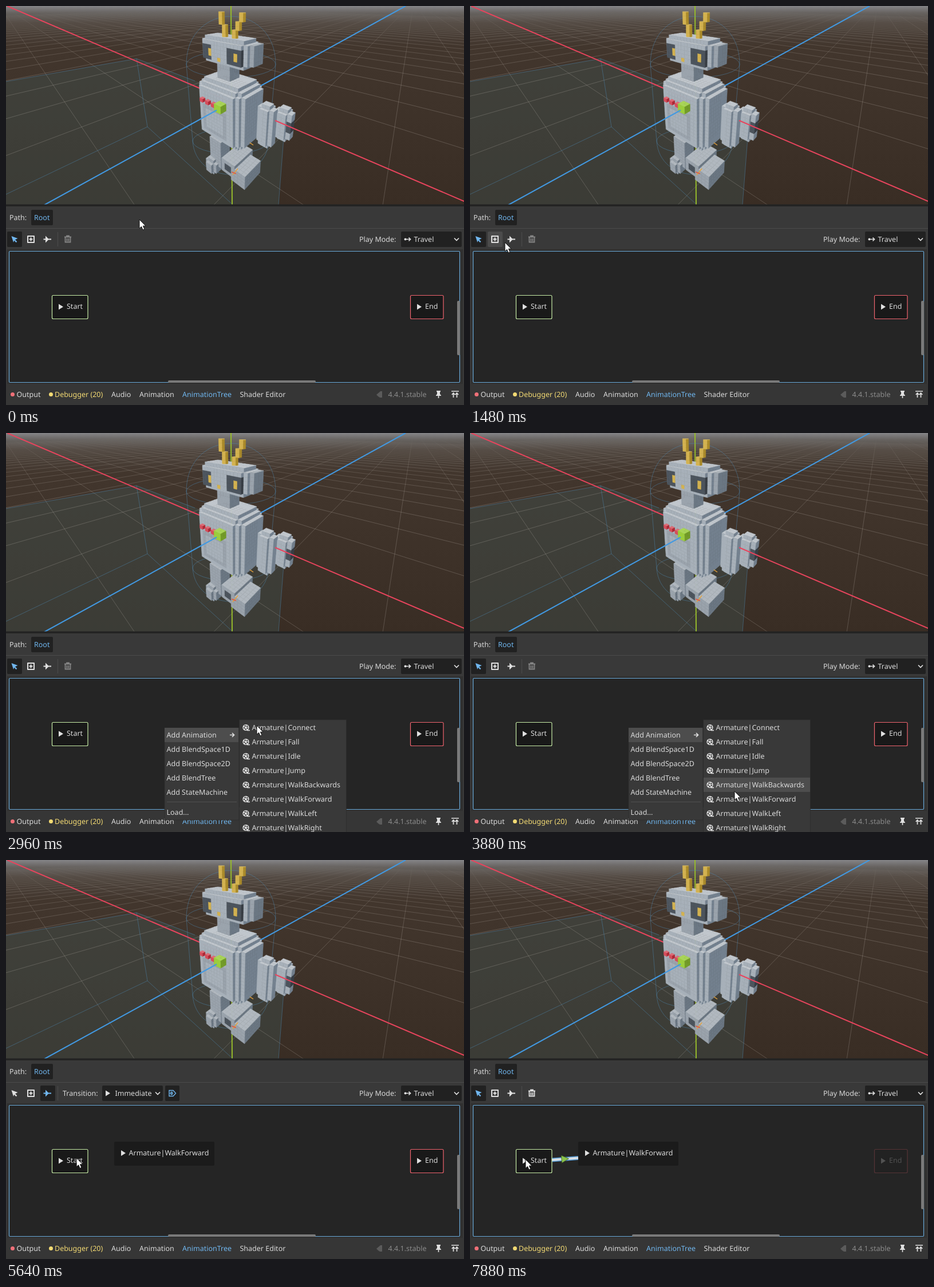
An HTML page that plays this animation: 800x697 px, repeating every 8 s.

```html
<!DOCTYPE html>
<html lang="en">
<head>
<meta charset="utf-8">
<title>State machine editor</title>
<style>
html, body { margin: 0; width: 100%; height: 100%; overflow: hidden; background: #393939; }
svg { display: block; width: 100vw; height: 100vh; }
text { font: 12.5px "Noto Sans", "Open Sans", sans-serif; fill: #dadada; text-rendering: geometricPrecision; white-space: pre; }
.blue { fill: #70b6ee; }
.yellow { fill: #f3da73; }
.dim { fill: #8b8b8b; }
.well { fill: #212121; }
.wire { fill: none; stroke: #4f8db8; stroke-opacity: .45; }
.ico { fill: none; stroke: #e0e0e0; stroke-width: 1.7; }
.solid { fill: #e0e0e0; }
.thumb { fill: #7a7a7a; }
.node { fill: #191919; stroke-width: 1.2; }
</style>
</head>
<body>
<svg viewBox="0 0 800 697">
  <defs>
    <linearGradient id="ground" x2="0" y2="1">
      <stop offset="0" stop-color="#858588"/><stop offset=".035" stop-color="#66625f"/>
      <stop offset=".085" stop-color="#504740"/><stop offset=".2" stop-color="#42362d"/>
      <stop offset="1" stop-color="#392d24"/>
    </linearGradient>
    <linearGradient id="fade" gradientUnits="userSpaceOnUse" x1="0" y1="8" x2="0" y2="130">
      <stop offset="0" stop-color="#d8d0c8" stop-opacity="0"/>
      <stop offset=".35" stop-color="#d8d0c8" stop-opacity=".15"/>
      <stop offset="1" stop-color="#d8d0c8" stop-opacity=".22"/>
    </linearGradient>
    <clipPath id="view"><path d="M0 0H800V347H0Z"/></clipPath>
    <path id="play" d="M0-5 8 0 0 5Z"/>
    <path id="chevron" d="M-4-2 0 2 4-2" class="ico"/>
    <g id="reel">
      <circle r="5.6" fill="#e0e0e0"/><path d="M2 5H7" stroke="#e0e0e0" stroke-width="1.6"/>
      <circle r="3" fill="none" stroke="#383838" stroke-width="2.4" stroke-dasharray="2.2 1.57"/>
    </g>
  </defs>

  <g clip-path="url(#view)">
    <path fill="url(#ground)" d="M0 0H800V347H0Z"/>
    <path fill="#3e4e4c" fill-opacity=".45" d="M0 132 228 92 488 190 476 347H0Z"/>
    <path id="grid" fill="none" stroke="url(#fade)"/>
    <path class="wire" d="M0 132 228 92 247 211 0 329M247 211 396 347M228 92 330 131M487 205 476 347"/>
    <g fill="none" stroke-width="2">
      <path stroke="#e8445d" d="M2 0 394 167.500"/>
      <path stroke="#4299e1" d="M394 167.500 698 0"/>
      <path stroke="#95b92c" d="M393 0 395 347"/>
    </g>
    <path class="wire" d="M315 102C315-10 471-10 471 102L459 235C455 314 330 314 326 235Z"/>
    <ellipse class="wire" cx="393" cy="102" rx="78" ry="23"/>
    <ellipse class="wire" cx="392" cy="236" rx="66" ry="22"/>
    <g id="robot" stroke-width=".5" stroke-linejoin="round"></g>
    <g fill="none" stroke-width="2">
      <path stroke="#4299e1" d="M67 347.500 368 182"/>
      <path stroke="#e8445d" d="M470 200 800 341"/>
      <path stroke="#e6a23c" stroke-width="1.500" d="M396 295 405 284M426 239 432 243"/>
      <path stroke="#e2583f" stroke-width="1.500" d="M394 290 402 293"/>
    </g>
  </g>

  <path fill="#393939" d="M0 347H800V697H0Z"/>
  <path fill="#232323" d="M0 346.500H800V350H0Z"/>
  <text x="6" y="373.500">Path:</text>
  <rect class="well" x="44" y="356" width="38" height="27" rx="2"/>
  <text x="49" y="373.500" class="blue">Root</text>
  <path stroke="#4b4b4b" d="M0 388.500H800M90.500 395V420"/>

  <rect id="selectBg" x="2" y="394" width="26" height="27" rx="2"/>
  <rect id="addBg" x="31" y="394" width="26" height="27" rx="2"/>
  <rect id="connectBg" x="60" y="394" width="26" height="27" rx="2"/>
  <path id="selectIcon" d="M9.500 402 20.500 406 16 408.200 19.300 411.600 17.700 413.200 14.300 409.800 13 413Z"/>
  <path class="ico" d="M38 402H49V413H38ZM43.500 404.500V410.500M40.500 407.500H46.500" stroke-linejoin="round" style="stroke-width:2"/>
  <path id="connectIcon" d="M65.500 406.500H69V401.500L74 406.500H79V408.500H74L69 413.500V408.500H65.500Z"/>
  <path id="trash" fill="none" stroke="#e0e0e0" stroke-width="1.800" d="M102 403.500H114M106 403V401.500H110V403M103.500 404V412.500H112.500V404M106.500 406V411M109.500 406V411"/>
  <g id="transitionBar">
    <text x="99" y="411.500">Transition:</text>
    <rect class="well" x="168" y="394" width="106" height="27" rx="2"/>
    <use href="#play" x="174" y="407.500" class="solid"/>
    <text x="190.500" y="411.500">Immediate</text>
    <use href="#chevron" x="265" y="407.500"/>
    <rect class="well" x="278" y="394" width="25" height="27" rx="2"/>
    <path d="M285 402.500H292L296.500 407.500 292 412.500H285ZM286 407.500H292M287.500 405.500H291M287.500 409.500H291" fill="none" stroke="#70b6ee" stroke-width="1.400"/>
  </g>
  <text x="617" y="411.500">Play Mode:</text>
  <rect class="well" x="690" y="394" width="106" height="27" rx="2"/>
  <path class="ico" d="M697 407.500H706M703.500 404.500 706.500 407.500 703.500 410.500"/><circle class="solid" cx="697.500" cy="407.500" r="2"/>
  <text x="712.500" y="411.500">Travel</text>
  <use href="#chevron" x="787" y="407.500"/>

  <rect x="2" y="425" width="796" height="235" fill="#303030"/>
  <rect x="5.500" y="428.500" width="787" height="229" rx="1.500" fill="#252525" stroke="#69a9d8" stroke-width="1.200"/>
  <rect class="thumb" x="788" y="515" width="5" height="95" rx="2"/>
  <rect class="thumb" x="283" y="654" width="258" height="4" rx="2"/>
  <path fill="#363636" d="M0 660H800V697H0Z"/>

  <g id="link">
    <path id="linkEdge" stroke="#5499d2" stroke-width="7"/>
    <path id="linkCore" stroke="#d9e0e6" stroke-width="4"/>
    <path id="linkArrow" d="M-6-6.500 6.500 0-6 6.500Z" fill="#8bc34a" stroke="#3d5a28" stroke-width=".8"/>
  </g>
  <rect class="node" x="80.500" y="505.500" width="62.500" height="41" rx="2" stroke="#c6eca6"/>
  <use href="#play" x="92" y="525.500" class="solid"/><text x="106" y="529">Start</text>
  <g id="end">
    <rect class="node" x="706.500" y="505.500" width="57.500" height="41" rx="2" stroke="#f0646f"/>
    <use href="#play" x="718" y="525.500" class="solid"/><text x="732" y="529">End</text>
  </g>
  <g id="walk">
    <rect x="189" y="492" width="175" height="42" rx="2" fill="#1b1b1b"/>
    <use href="#play" x="201" y="512" class="solid"/><text x="214.500" y="516">Armature|WalkForward</text>
  </g>

  <circle cx="11.500" cy="678.500" r="3.500" fill="#ef7078"/><text x="18.500" y="682.500">Output</text>
  <circle cx="78.500" cy="678.500" r="3.500" fill="#f3da73"/><text x="85" y="682.500" class="yellow">Debugger (20)</text>
  <text x="184" y="682.500">Audio</text>
  <text x="233" y="682.500">Animation</text>
  <text x="308" y="682.500" class="blue">AnimationTree</text>
  <text x="408.500" y="682.500">Shader Editor</text>
  <path fill="#5b5b5b" d="M647 679 654 673H657V684H653L650 682Z"/>
  <text x="667.500" y="682.500" class="dim">4.4.1.stable</text>
  <path class="solid" d="M752 672H759V673.500L758 674.500V678L760 680V681H756.300V685H754.700V681H751V680L753 678V674.500L752 673.500Z"/>
  <path class="ico" d="M778 673H791M781.500 684V676M778.800 679 781.500 676 784.200 679M787.500 684V676M784.800 679 787.500 676 790.200 679"/>

  <g id="menu">
    <rect x="277" y="515" width="130" height="161" fill="#393939" stroke="#2c2c2c" stroke-width=".7"/>
    <rect id="menuHover" x="277" y="515" width="129" height="25" fill="#4d4d4d"/>
    <path stroke="#515151" d="M281 644.500H403"/>
    <path class="ico" d="M391 527.500H398M395 524 398.500 527.500 395 531"/>
  </g>
  <g id="submenu">
    <rect x="407.500" y="501" width="187" height="200" fill="#393939" stroke="#2c2c2c" stroke-width=".7"/>
    <rect id="subHover" x="408" width="186" height="25" fill="#4d4d4d"/>
  </g>
  <path id="cursor" d="M0 0V15.500L3.600 12.300 6 18 8.800 16.800 6.400 11.200H11Z" fill="#fff" stroke="#111"/>
</svg>

<script>
const $ = id => document.getElementById(id);
const LOOP = 8000, STEP = 40;

// Three-point perspective shared by the floor and the voxels.
const origin = [394, 167.5];
const axes = [
  { away: [-16.7, -8], scale: 0.0125 },
  { away: [398, 1100], scale: 0.006 },
  { away: [712.5, -8], scale: 0.0125 }
];
function project(...point) {
  const weights = axes.map((axis, i) => axis.scale * point[i]);
  const w = 1 - weights[0] - weights[1] - weights[2];
  return origin.map((o, k) =>
    (axes.reduce((sum, axis, i) => sum - weights[i] * axis.away[k], o) / w).toFixed(1)).join(" ");
}

function floorLines() {
  const CELL = 16, FAR = -720, NEAR = 60;
  let d = "";
  for (let n = -32; n <= 14; n++) {
    const at = n * CELL, end = NEAR - at;
    if (n) d += `M${project(at, 0, FAR)} ${project(at, 0, end)}M${project(FAR, 0, at)} ${project(end, 0, at)}`;
  }
  return d;
}
$("grid").setAttribute("d", floorLines());

// Robot: boxes of voxels; a cut rounds the edges in steps, later boxes repaint earlier ones.
const tones = {
  steel: [210, 11, 69], mid: [210, 10, 64], dark: [212, 10, 33],
  gold: [45, 60, 57], red: [354, 62, 57], lime: [81, 60, 52]
};
const voxels = new Map();
function box(tone, [x0, y0, z0], size, cut = 0) {
  const [w, h, d] = size;
  for (let x = 0; x < w; x++) for (let y = 0; y < h; y++) for (let z = 0; z < d; z++) {
    const lack = [x, y, z].reduce((sum, v, i) =>
      sum + Math.max(0, cut - Math.min(v, size[i] - 1 - v)), 0);
    if (lack <= cut) voxels.set([x0 + x, y0 + y, z0 + z].join(), { tone, at: [x0 + x, y0 + y, z0 + z] });
  }
}
function buildRobot() {
  box("steel", [-8, -11, -6], [15, 18, 12], 2);
  box("mid", [-5, -8, 5], [8, 8, 1]);
  box("steel", [-4, -7, 5], [6, 6, 1]);
  for (let i = 0; i < 3; i++) box("red", [-5 + 2 * i, 1, 6], [1, 1, 1]);
  box("lime", [1, 1, 6], [2, 2, 2]);

  box("mid", [-3, 7, -2], [4, 4, 4]);
  box("steel", [-8, 11, -4], [14, 7, 7], 1);
  box("mid", [6, 12, -3], [1, 5, 4], 0);
  for (const x of [-7, 1]) {
    box("dark", [x, 12, 2], [x < 0 ? 3 : 4, 4, 1]);
    box("gold", [x + 2, 13, 2], [1, 2, 1]);
  }
  box("gold", [-2, 12, 2], [1, 1, 1]);
  for (let i = 0; i < 2; i++) box("gold", [-2 - i, 18 + 3 * i, 0], [1, 3, 1]);
  for (let i = 0; i < 3; i++) box("gold", [1 + i, 18 + 2 * i, 0], [1, 2, 1]);

  box("steel", [8, -9, -3], [4, 12, 4], 1);
  box("steel", [11, -7, -6], [4, 9, 4], 1);
  box("dark", [14, -4, -5], [1, 3, 2]);

  box("mid", [-4, -20, 1], [4, 9, 4]);
  box("mid", [-5, -23, 2], [4, 5, 5], 1);
  box("mid", [3, -16, 0], [4, 4, 8]);
  box("mid", [6, -17, 1], [4, 4, 7]);
  box("dark", [4, -15, 7], [2, 2, 1]);
}
const corners = [[0, 0], [1, 0], [1, 1], [0, 1]];
const light = [0.73, 1.13, 1];
function drawRobot() {
  const depth = v => v.at[0] + v.at[1] + v.at[2];
  const faces = [];
  for (const { tone, at } of [...voxels.values()].sort((a, b) => depth(a) - depth(b)))
    for (let axis = 0; axis < 3; axis++) {
      const next = at.map((v, i) => v + (i === axis));
      if (voxels.has(next.join())) continue;
      const points = corners.map(([u, v]) => {
        const p = [...next];
        p[(axis + 1) % 3] += u;
        p[(axis + 2) % 3] += v;
        return project(...p);
      });
      const [hue, sat, lum] = tones[tone];
      const color = `hsl(${hue} ${sat}% ${lum * light[axis]}%)`;
      faces.push(`<path fill="${color}" stroke="${color}" d="M${points.join("L")}Z"/>`);
    }
  $("robot").innerHTML = faces.join("");
}
buildRobot();
drawRobot();

const label = (x, y, s) => `<text x="${x}" y="${y}">${s}</text>`;
const kinds = ["Animation", "BlendSpace1D", "BlendSpace2D", "BlendTree", "StateMachine"];
$("menu").insertAdjacentHTML("beforeend",
  kinds.map((k, i) => label(280.5, 532 + i * 25, "Add " + k)).join("") + label(280.5, 666.5, "Load..."));
const clips = ["Connect", "Fall", "Idle", "Jump", "WalkBackwards", "WalkForward", "WalkLeft", "WalkRight"];
$("submenu").insertAdjacentHTML("beforeend", clips.map((c, i) =>
  `<use href="#reel" x="419" y="${514.5 + i * 25}"/>` + label(429.5, 518.5 + i * 25, "Armature|" + c)).join(""));

// Pointer moves: leave, arrive, x, y
const moves = [
  [40, 720, 42, 408], [1320, 1480, 61, 413], [1480, 1680, 289, 505], [1680, 1760, 277, 514],
  [1960, 2480, 330, 527], [2760, 2960, 438, 511], [2960, 4120, 465, 640],
  [4360, 4920, 60, 449], [4920, 5120, 74, 409], [5280, 5700, 126, 527],
  [5760, 6000, 345, 530], [6000, 6120, 302, 515],
  [6480, 6680, 64, 427], [6680, 6840, 14, 409], [7280, 7720, 97, 523]
];
function pointerAt(t) {
  return moves.reduce(([x, y], [leave, arrive, toX, toY]) => {
    const u = Math.min(1, Math.max(0, (t - leave) / (arrive - leave)));
    const ease = u * u * (3 - 2 * u);
    return [x + (toX - x) * ease, y + (toY - y) * ease];
  }, [233, 373]);
}

const show = (id, on) => $(id).setAttribute("display", on ? "inline" : "none");
const paint = (id, fill) => $(id).setAttribute("fill", fill);

function drawLink(x, y, selected) {
  const from = [143, 524], d = `M${from} ${x} ${y}`;
  $("linkEdge").setAttribute("d", d);
  $("linkCore").setAttribute("d", d);
  show("linkEdge", selected);
  const turn = Math.atan2(y - from[1], x - from[0]) * 180 / Math.PI;
  $("linkArrow").setAttribute("transform",
    `translate(${(from[0] + x) / 2} ${(from[1] + y) / 2}) rotate(${turn})`);
}

function render(time) {
  const t = Math.floor(time % LOOP / STEP) * STEP;
  const during = (a, b) => t >= a && t < b;
  const [x, y] = pointerAt(t);

  const connecting = during(5240, 7280);
  const tool = (name, left, active) => {
    const hover = y >= 394 && y < 421 && x >= left && x < left + 31;
    paint(name + "Bg", active ? "#212121" : hover ? "#4b4b4b" : "none");
  };
  tool("select", 2, !connecting);
  tool("add", 31, false);
  tool("connect", 62, connecting);
  paint("selectIcon", connecting ? "#e0e0e0" : "#70b6ee");
  paint("connectIcon", connecting ? "#70b6ee" : "#e0e0e0");
  show("transitionBar", connecting);
  show("trash", !connecting);
  $("trash").setAttribute("opacity", t >= 7280 ? 1 : 0.45);

  show("menu", during(1920, 4360));
  show("menuHover", t >= 2000);
  show("submenu", during(2440, 4360));
  show("subHover", t >= 3000);
  $("subHover").setAttribute("y", 502 + 25 * Math.max(0, Math.floor((y - 502) / 25)));

  const linked = t >= 6480;
  show("walk", t >= 4360);
  $("end").setAttribute("opacity", linked ? 0.24 : 1);
  show("link", t >= 5800);
  if (linked || x > 189) drawLink(189, 520.5, linked);
  else drawLink(Math.max(x, 144), y, false);

  $("cursor").setAttribute("transform", `translate(${x.toFixed(1)} ${y.toFixed(1)})`);
}

const start = performance.now();
function tick() {
  render(performance.now() - start);
  requestAnimationFrame(tick);
}
tick();
</script>
</body>
</html>
```
